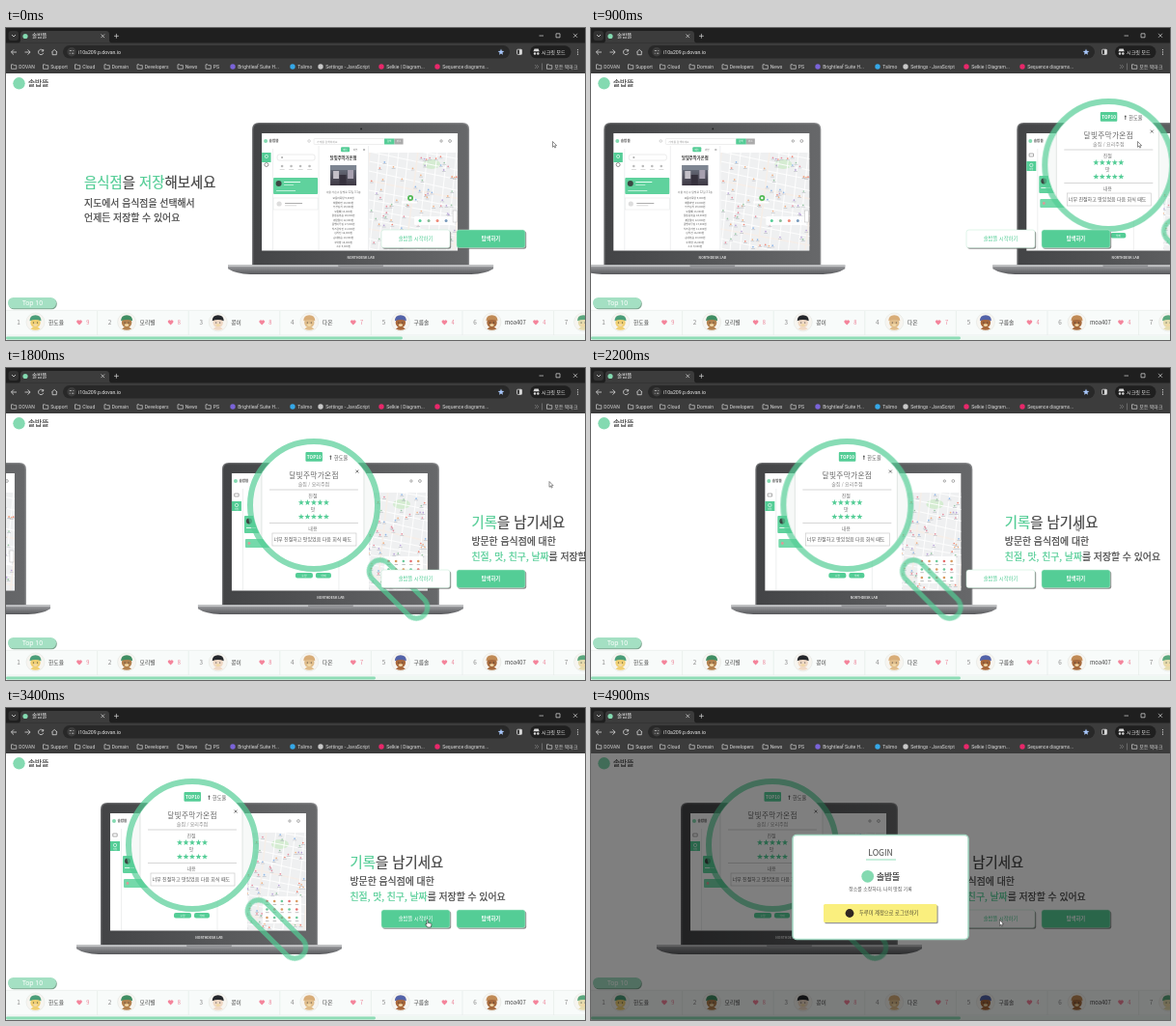
These frames come from a looping animation (600x323 px, 5.1 s). An HTML page:

```html
<!DOCTYPE html>
<html lang="ko">
<head>
<meta charset="utf-8">
<title>솔밥뜰</title>
<style>
html, body { margin: 0; width: 100%; height: 100%; overflow: hidden; background: #fff; }
svg { display: block; width: 100vw; height: 100vh; font-family: "Noto Sans CJK KR", "Noto Sans CJK", sans-serif; }
.ui { font-family: Roboto, "Noto Sans CJK KR", sans-serif; }
</style>
</head>
<body>
<svg id="stage" viewBox="0 0 600 323" xmlns="http://www.w3.org/2000/svg"></svg>
<script>
const GREEN = '#54cd96', MINT = '#84dab1', INK = '#444';
const BRAND = '솔밥뜰', SHOP = '달빛주막가온점';
const LOOP = 5100, STEP = 100, SPACING = 428;

// Drawing helpers; text is placed by its vertical centre.
const rect = (x, y, w, h, fill, more = '') =>
  `<rect x="${x}" y="${y}" width="${w}" height="${h}" fill="${fill}" ${more}/>`;
const circ = (x, y, r, fill, more = '') =>
  `<circle cx="${x}" cy="${y}" r="${r}" fill="${fill}" ${more}/>`;
const line = (d, color, width = 1, more = '') =>
  `<path d="${d}" fill="none" stroke="${color}" stroke-width="${width}" ${more}/>`;
const shape = (d, fill, more = '') => `<path d="${d}" fill="${fill}" ${more}/>`;
const text = (x, y, size, str, fill = INK, more = '') =>
  `<text x="${x}" y="${(y + size * 0.37).toFixed(2)}" font-size="${size}" fill="${fill}" ${more}>${str}</text>`;
const mid = (x, y, size, str, fill, more = '') =>
  text(x, y, size, str, fill, 'text-anchor="middle" ' + more);
// Medium weight: regular glyphs with a hairline outline.
const firm = (x, y, size, str, fill = INK) =>
  text(x, y, size, str, fill, `stroke="${fill}" stroke-width=".22"`);
const span = str => `<tspan fill="${GREEN}" stroke="${GREEN}">${str}</tspan>`;
const shift = (x, y, body) => `<g transform="translate(${x} ${y})">${body}</g>`;
const times = (n, fn) => Array.from({ length: n }, (_, i) => fn(i)).join('');

function random(seed) {
  return () => (seed = (seed * 16807) % 2147483647) / 2147483647;
}

function star(x, y, r, fill) {
  const pts = Array.from({ length: 10 }, (_, i) => {
    const a = i * Math.PI / 5 - Math.PI / 2, q = i % 2 ? r * 0.42 : r;
    return (x + q * Math.cos(a)).toFixed(2) + ',' + (y + q * Math.sin(a)).toFixed(2);
  });
  return `<polygon points="${pts.join(' ')}" fill="${fill}"/>`;
}

function folder(x) {
  return line(`M${x - 2.5} 37.8h2l.8 .9h2.5v3.6h-5.3z`, '#d0d0d0', 0.7);
}

function browser() {
  const light = '#d8d8d8';
  const folders = [[8, 'DOVAN'], [41, 'Support'], [74, 'Cloud'], [104.5, 'Domain'],
    [138.5, 'Developers'], [180.5, 'News'], [209.5, 'PS'], [563, '모든 북마크']];
  const links = [[235, 'Brightleaf Suite H...', '#7a63d8'], [297, 'Talimo', '#35a8e8'],
    [326, 'Settings - JavaScript', '#c8c8c8'], [389, 'Selkie | Diagram...', '#e8276a'],
    [447, 'Sequence diagrams...', '#e8276a']];
  return `<g class="ui">` +
    rect(0, 0, 600, 47, '#3c3c3c') + rect(0, 0, 600, 15.5, '#1f1f1f') +
    rect(2.5, 3, 10.5, 10, '#333', 'rx="3"') + line('M6 7l2 2 2-2', light, 0.8) +
    shape('M12 15.5q3 0 3-3v-6q0-3.5 3.5-3.5h85q3.5 0 3.5 3.5v6q0 3 3 3z', '#3c3c3c') +
    circ(20, 8.5, 2.6, MINT) + text(27, 8, 5.6, BRAND, '#e8e8e8') +
    line('M98.5 6.5l3.6 3.6m0-3.6l-3.6 3.6M112 8.3h4.8m-2.4-2.4v4.8', light, 0.7) +
    line('M552.5 8h4.5M570 5.8h4v4h-4zM588 5.8l4 4m0-4l-4 4', light, 0.7) +
    line('M11 25H5.5m2.5-2.6L5.4 25 8 27.6M19.5 25H25m-2.5-2.6L25.1 25 22.5 27.6', light, 0.8) +
    line('M38.6 23.6a2.7 2.7 0 1 0 .2 2.2m-.1-3.8v2h-2', light, 0.8) +
    line('M47.3 25l2.9-2.6 2.9 2.6m-5-.5v3.2h4.2v-3.2', light, 0.8) +
    rect(59, 18, 463, 13.5, '#282828', 'rx="6.7"') + circ(68, 24.8, 4.7, '#3c3c3c') +
    line('M65.8 23.5h2.2m1.3 0h1M65.8 26.2h1m1.3 0h2.2', light, 0.7) +
    text(75, 24.8, 5.2, 'i10a209.p.dovan.io', '#e8e8e8') + star(513, 25, 3.5, '#a8c7fa') +
    rect(529.5, 22.2, 5, 5.2, 'none', `rx="1" stroke="${light}" stroke-width=".8"`) +
    rect(532, 22.2, 2.5, 5.2, light) +
    rect(543, 18.3, 42.5, 13, '#1f1f1f', 'rx="6.5"') +
    shape('M546.5 24.3h6.2l-1-2.8h-4.2z', light) + circ(548, 26.5, 1.2, light) + circ(551.3, 26.5, 1.2, light) +
    text(555, 24.8, 5.1, '시크릿 모드', '#eee') +
    times(3, i => circ(592.5, 22.6 + i * 2.3, 0.6, light)) +
    folders.map(([x, s]) => folder(x) + text(x + 5.3, 40, 5, s, light)).join('') +
    links.map(([x, s, c]) => circ(x, 40, 2.7, c) + text(x + 5.2, 40, 5, s, light)).join('') +
    line('M548 38l1.8 2-1.8 2m2-4l1.8 2-1.8 2M555.5 36.5v7', '#888', 0.6) +
    `</g>`;
}

function streetMap(x, seed) {
  const rnd = random(seed), colors = ['#ef8b7c', '#f0b48a', '#8fb7e8', '#b9a3d8', '#9cc7a8', '#e58fa0'];
  let out = rect(x, 129, 239 - x, 101, '#eff0f1');
  out += `<ellipse cx="212" cy="141" rx="9" ry="5" fill="#d5ecd2"/>`;
  out += times(13, i => line(`M147 ${108 + i * 10}l95 ${16 + rnd() * 6}`, i % 5 ? '#fff' : '#f6eee8', i % 5 ? 0.9 : 1.6));
  out += times(11, i => line(`M${148 + i * 10} 127l${-14 + rnd() * 4} 106`, i % 5 ? '#fff' : '#f6eee8', i % 5 ? 0.9 : 1.6));
  out += times(85, () => {
    const px = 148 + rnd() * 90, py = 131 + rnd() * 97, c = colors[Math.floor(rnd() * 6)];
    return circ(px.toFixed(1), py.toFixed(1), 0.85, c) +
      rect((px - 1.8).toFixed(1), (py + 1.4).toFixed(1), 3.8, 0.6, '#b8bbc2');
  });
  return `<g clip-path="url(#map${x})">${out}</g>`;
}

function laptop() {
  return shape('M26 249V105q0-7 7-7H244q7 0 7 7V249z', 'url(#lid)') +
    shape('M27.3 246V105q0-5.8 5.8-5.8H244q5.8 0 5.8 5.8V246z', 'url(#bezel)') +
    circ(139, 104.4, 0.9, '#202123') +
    rect(36, 109, 203, 121.5, '#fff') +
    mid(138.5, 237.3, 3.4, 'NORTHDESK LAB', '#ddd', 'font-weight="700"') +
    shape('M1 245.3H276V249.3Q268 254.6 253 255H24Q9 254.6 1 249.3z', 'url(#base)') +
    rect(1, 245.3, 275, 1.8, '#c2c3c5') +
    shape('M115 245.3h47q0 3.2-4 3.2h-39q-4 0-4-3.2z', '#929396');
}

function siteHeader() {
  return circ(40, 117, 2, MINT) + text(43.5, 117, 3.6, BRAND, '#555', 'font-weight="700"') +
    circ(222, 117, 1.2, 'none', 'stroke="#777" stroke-width=".6"') +
    circ(231, 117, 1.4, 'none', 'stroke="#777" stroke-width=".6"');
}

function slideOne() {
  const menu = ['모둠어묵탕', '해물라면', '두부김치', '오돌뼈', '닭똥집볶음', '계란말이', '골뱅이무침', '치즈감자전', '김치전', '순대볶음', '주먹밥', '소주'];
  const screen = laptop() + siteHeader() +
    circ(85, 117, 1.3, 'none', 'stroke="#aaa" stroke-width=".5"') +
    rect(90, 114.5, 73, 6, '#fff', 'rx="1" stroke="#ddd" stroke-width=".5"') +
    text(93, 117.5, 2.8, '가게를 검색하세요', '#999') +
    rect(163, 114.5, 10.5, 6, GREEN) + rect(173.5, 114.5, 9, 6, '#aaa') +
    mid(168, 117.5, 2.6, '검색', '#fff') + mid(178, 117.5, 2.6, '취소', '#fff') +
    rect(36, 129, 9.5, 10, GREEN) + circ(40.8, 133, 1.6, 'none', 'stroke="#fff" stroke-width=".6"') +
    circ(40.8, 141.5, 2, 'none', 'stroke="#666" stroke-width=".7"') +
    line('M47.5 125v105M95 122v108M146.5 122v108', '#e3e5e6', 0.6) +
    rect(52, 131, 39, 6, '#fff', 'rx="2" stroke="#ddd" stroke-width=".6"') + circ(57, 134, 1, '#aaa') +
    times(4, i => circ(57 + i * 9.5, 143, 1.3, '#bbb') + rect(54.6 + i * 9.5, 146, 5, 0.7, '#ccc')) +
    rect(48, 155, 46, 17, '#5fd29d', 'rx="1"') + circ(53.5, 161, 3, '#3b4743') +
    rect(59, 159, 17, 1, '#e5fff3') + rect(59, 162, 10, 0.8, '#c9f3df') +
    rect(51, 168, 20, 0.8, '#d9f9ea') +
    rect(48, 176, 46, 12, '#fff', 'stroke="#e1e4e4" stroke-width=".5"') +
    circ(54, 182, 2.6, '#ddd') + rect(60, 181, 18, 0.8, '#999') + rect(60, 183.5, 12, 0.7, '#ccc') +
    rect(118, 123.2, 9, 5, GREEN, 'rx="1"') + mid(122.5, 125.8, 2.6, '메뉴', '#fff') +
    mid(133, 125.8, 2.6, '리뷰', '#777') + line('M141 125l2 2m0-2l-2 2', '#555', 0.4) +
    mid(120.5, 134, 4.3, SHOP, '#333', 'font-weight="700"') +
    rect(107, 142, 27, 21, 'url(#photo)') + rect(107, 142, 27, 5, '#7d8591') +
    rect(110, 148, 6, 8, '#c4c0c8') + rect(125, 147, 6, 9, '#a7a0af') + rect(116.5, 152, 7, 11, '#36313d') +
    mid(120.5, 170, 2.8, '서울 가온구 달빛로 12길 3 1층', '#666') +
    menu.map((m, i) => mid(120.5, 176 + i * 4.55, 2.7, `${m} ${9 + i * 5 % 11},000원`, '#555')).join('') +
    streetMap(147, 71) +
    circ(190, 176, 3, '#52b957') + circ(190, 176, 1.2, '#fff') + rect(181, 179.3, 16, 2.2, '#fff') +
    rect(194, 195, 42, 9, '#fff', 'rx="1" opacity=".9"') +
    times(4, i => circ(200 + i * 9, 199.5, 1.5, [GREEN, '#8b9', '#e87', '#79b'][i])) +
    rect(234, 189, 4, 12, '#fff', 'stroke="#aaa" stroke-width=".4"');
  return shift(2, 0, screen) +
    firm(-146, 160, 14.4, span('음식점') + '을 ' + span('저장') + '해보세요') +
    firm(-146, 181.2, 9.9, '지도에서 음식점을 선택해서') +
    firm(-146, 196.3, 9.9, '언제든 저장할 수 있어요');
}

function lens() {
  const stars = y => times(5, i => star(-13 + i * 6.5, y, 3.2, GREEN));
  const card = circ(0, 142, 63.5, '#fff') +
    `<g clip-path="url(#glass)">` + rect(-70, 73, 16, 140, '#f7f9f8') + rect(52, 73, 20, 140, '#f7f9f8') +
    line('M-54 99V212M52 99V212', '#d6dbd9', 0.7) + `</g>` +
    rect(-8.5, 87, 17.5, 9.8, GREEN, 'rx="1"') + mid(0.3, 92, 4.6, 'TOP10', '#fff', 'font-weight="700"') +
    circ(17.5, 91.4, 0.9, '#555') + line('M17.5 92v3', '#555', 0.8) + text(21, 92.6, 5.2, '한도율', '#555') +
    line('M43.5 105.6l3 3m0-3l-3 3', '#444', 0.7) +
    mid(0, 111.6, 7.7, SHOP, '#666', 'letter-spacing=".3"') + mid(0, 120.6, 5, '술집 / 요리주점', '#888') +
    line('M-46 126h92M-46 160.5h92', '#bbb', 0.6) +
    mid(-1, 132, 5, '친절', '#777') + stars(139.3) + mid(-1, 146.6, 5, '맛', '#777') + stars(154) +
    mid(-1, 165.8, 5, '내용', '#777') +
    rect(-43, 171, 87, 13, '#fff', 'stroke="#ccc" stroke-width=".7"') +
    text(-41.5, 177.2, 5, '너무 친절하고 맛있었음 다음 회식 때도', '#555');
  const frame = circ(0, 142, 66, 'none', `stroke="${GREEN}" stroke-width="6"`) +
    `<g transform="translate(87.5 229) rotate(45)">` +
    rect(-38, -11.5, 76, 23, 'none', `rx="11.5" stroke="${GREEN}" stroke-width="5"`) + `</g>`;
  return shift(123, 0, card + `<g opacity=".7">${frame}</g>`);
}

function slideTwo() {
  const screen = laptop() + siteHeader() +
    rect(36, 138, 10, 10, GREEN) + circ(41, 142, 1.7, 'none', 'stroke="#fff" stroke-width=".6"') +
    line('M38.8 133v-3h4.4v3z', '#777', 0.6) + mid(41, 146.3, 2.2, '저장', '#fff') +
    line('M47.5 125v105M147 190v40', '#e1e4e4', 0.6) + line('M62.5 139h5m-2.5-2.5v5', '#666', 0.7) +
    rect(49, 153, 30, 18, '#5fd29d', 'rx="1"') + circ(54, 158.5, 3, '#3b4743') +
    rect(51, 165, 10, 1, '#dff9ec') +
    rect(50, 177, 30, 9, '#74d9aa', 'rx="1"') + circ(54, 181.5, 1.4, '#d99') +
    streetMap(178, 137) +
    rect(194, 195, 40, 28, '#fff', 'opacity=".95"') +
    times(15, i => circ(198.5 + i % 5 * 7.7, 200 + Math.floor(i / 5) * 8.5, 1.3, ['#e66d6d', '#6cc99a', '#d99a60'][i * 2 % 3]) +
      rect(197 + i % 5 * 7.7, 203 + Math.floor(i / 5) * 8.5, 3.5, 0.6, '#999')) +
    rect(102, 212, 18, 5.5, GREEN, 'rx="2"') + rect(123, 212, 16, 5.5, GREEN, 'rx="2"') +
    mid(111, 214.8, 2.8, '수정', '#fff') + mid(131, 214.8, 2.8, '삭제', '#fff');
  return shift(2, 0, screen) + lens() +
    firm(286.5, 159.2, 14.4, span('기록') + '을 남기세요') +
    firm(286.5, 179.6, 9.9, '방문한 음식점에 대한') +
    firm(286.5, 195, 9.9, span('친절, 맛, 친구, 날짜') + '를 저장할 수 있어요');
}

function avatar(x, head, hat) {
  return circ(x, 304.5, 9.5, '#f7f5f0', 'stroke="#e3e6e3" stroke-width=".6"') +
    shape(`M${x - 5} 311.5q5-5 10 0q-5 2.5-10 0z`, head) + circ(x, 305, 5.2, head) +
    shape(`M${x - 6} 303.2q0-6 6-6t6 6q-6-2.4-12 0z`, hat) +
    circ(x - 2, 305, 0.6, '#333') + circ(x + 2, 305, 0.6, '#333') +
    `<ellipse cx="${x}" cy="307.6" rx="2.2" ry="1.4" fill="#f1d9a8"/>`;
}

function ranking() {
  const rows = [['한도율', 9, '#f0cf72', '#4a9d78'], ['모리별', 8, '#b3824f', '#3f8d62'],
    ['콩이', 8, '#f0d9c5', '#25272b'], ['다온', 7, '#e0bd8b', '#d8ad78'],
    ['구름솔', 4, '#a9683b', '#5262a8'], ['moa407', 4, '#a66a3d', '#c08a55'], ['', '', '#e6dcae', '#5aa77d']];
  const heart = x => shape(`M${x} 307.6l-2.5-2.6a1.6 1.6 0 0 1 2.5-2a1.6 1.6 0 0 1 2.5 2z`, '#f4849b');
  return rect(2.8, 280, 50, 11.3, '#7fa691', 'rx="5.5"') + rect(2, 279, 50, 11.3, '#a4e0c3', 'rx="5.5"') +
    mid(27.5, 284.6, 6.8, 'Top 10', '#fff', 'style="font-family:\'Noto Sans\',sans-serif"') +
    rect(0, 292, 600, 27, '#f8fbfa') + line('M0 292.3H600M0 318H600', '#e2e9e6', 0.6) +
    rows.map(([name, likes, head, hat], i) => {
      const x = i * 94.6;
      return mid(x + 13, 304.6, 6.4, i + 1, '#888') + avatar(x + 30.5, head, hat) +
        (name && text(x + 44, 304.8, 5.8, name, '#444') + heart(x + 76) + mid(x + 84.7, 304.8, 5.6, likes, '#ec7f95')) +
        line(`M${x + 94.6} 293v25`, '#e4ebe8', 0.7);
    }).join('') +
    rect(0, 319, 600, 4, '#eef7f2') + rect(0, 319.6, 383, 2.8, '#8edcb6', 'id="thumb" rx="1.4"');
}

function button(x, label, id, weight) {
  return rect(x + 1.2, 210.2, 71, 18.5, '#666', 'rx="2.5" opacity=".75"') +
    rect(x, 209, 71, 18.5, GREEN, `id="${id}" rx="2.5" stroke="#bfe8d3" stroke-width=".5"`) +
    mid(x + 35.5, 218, 5.3, label, '#fff', `id="${id}Text" font-weight="${weight}"`);
}

function login() {
  return `<g id="login">` + rect(0, 47, 600, 276, '#000', 'opacity=".5"') +
    rect(209, 131.5, 182, 108, '#fff', 'rx="4" stroke="#a4d9c4" stroke-width="1.5"') +
    mid(300, 150, 8.6, 'LOGIN') + line('M285 157h31', MINT, 0.9) +
    circ(286.7, 174.3, 6.4, MINT) + firm(296, 174.3, 8.7, BRAND, '#333') +
    mid(300, 187, 4.9, '장소를 소장하다, 나의 맛집 기록', '#555') +
    rect(242.2, 204.2, 117.5, 19, '#999', 'rx="1.5"') + rect(241, 203, 117.5, 19, '#faef7e', 'rx="1.5"') +
    circ(268, 212.5, 4.4, '#2f2622') + text(278, 212.5, 5.3, '두루미 계정으로 로그인하기', '#4a4632') + `</g>`;
}

function pointer() {
  return `<g id="pointer"><path id="arrow" d="M0 0v5.8l1.4-1.2.9 2 .9-.5-.9-1.9h1.8z" fill="#fff" stroke="#222" stroke-width=".5"/>` +
    `<path id="hand" d="M0 0q.9-.6 1.3.4v2.5l3 .7q.8.3.6 1.3l-.6 2.6h-3.6l-2.2-3q.2-1 1.5 0z" fill="#fff" stroke="#222" stroke-width=".6"/></g>`;
}

const gradient = (id, a, b, dir) => `<linearGradient id="${id}" x1="0" y1="0" ${dir}><stop stop-color="${a}"/><stop offset="1" stop-color="${b}"/></linearGradient>`;
const mapClip = x => `<clipPath id="map${x}">${rect(x, 129, 239 - x, 101, '#000')}</clipPath>`;

document.getElementById('stage').innerHTML =
  `<defs>` + gradient('lid', '#6a6b6d', '#88898b', 'x2="1" y2="0"') +
  gradient('bezel', '#434446', '#67686a', 'x2="1" y2="0"') +
  gradient('base', '#a0a1a4', '#58595c', 'x2="0" y2="1"') +
  gradient('photo', '#6f7684', '#3e3843', 'x2="0" y2="1"') +
  mapClip(147) + mapClip(178) + `<clipPath id="glass">${circ(0, 142, 63.5, '#000')}</clipPath></defs>` +
  rect(0, 0, 600, 323, '#fff') +
  `<g id="one">${slideOne()}</g><g id="two">${slideTwo()}</g>` +
  circ(13.5, 57.3, 6.2, MINT) + firm(23, 57, 7.7, BRAND) +
  ranking() + button(389, BRAND + ' 시작하기', 'start', 400) + button(467, '탐색하기', 'find', 700) +
  login() + browser() + pointer();

const el = id => document.getElementById(id);
const clamp = v => Math.min(1, Math.max(0, v));

// CSS "ease": cubic-bezier(.25, .1, .25, 1)
function ease(p) {
  p = clamp(p);
  const curve = (a, b, s) => 3 * a * s * (1 - s) ** 2 + 3 * b * s * s * (1 - s) + s ** 3;
  let lo = 0, hi = 1;
  for (let i = 0; i < 30; i++) {
    const s = (lo + hi) / 2;
    if (curve(0.25, 0.25, s) < p) lo = s; else hi = s;
  }
  return curve(0.1, 1, lo);
}

const path = [[0, 566.5, 117.5], [900, 566.5, 117.5], [1800, 563, 117.5], [2600, 443, 207.5],
  [2700, 441, 213], [3400, 436, 219.5], [4000, 424.5, 221], [4800, 424.5, 221], [4900, 423.5, 219.5], [LOOP, 423.5, 219.5]];

function pointerAt(t) {
  const i = path.findIndex(p => p[0] > t), [t0, x0, y0] = path[i - 1], [t1, x1, y1] = path[i];
  const k = (t - t0) / (t1 - t0);
  return [x0 + (x1 - x0) * k, y0 + (y1 - y0) * k];
}

function render(time) {
  const t = Math.floor(time % LOOP / STEP) * STEP;
  const x = 665 - 600 * ease((t + 120) / 4000);
  const hover = t >= 2700 && t < 4500;
  const [px, py] = pointerAt(t);
  el('two').setAttribute('transform', `translate(${x.toFixed(2)} 0)`);
  el('one').setAttribute('transform', `translate(${(x - SPACING).toFixed(2)} 0)`);
  el('thumb').setAttribute('width', t < 300 ? 411 : 383);
  el('start').setAttribute('fill', hover ? GREEN : '#fff');
  el('startText').setAttribute('fill', hover ? '#fff' : GREEN);
  el('login').setAttribute('opacity', clamp((t - 4400) / 200));
  el('pointer').setAttribute('transform', `translate(${px.toFixed(2)} ${py.toFixed(2)})`);
  el('hand').setAttribute('opacity', hover ? 1 : 0);
  el('arrow').setAttribute('opacity', hover ? 0 : 1);
}

const begin = performance.now();
function tick() {
  render(performance.now() - begin);
  requestAnimationFrame(tick);
}
tick();
</script>
</body>
</html>
```
